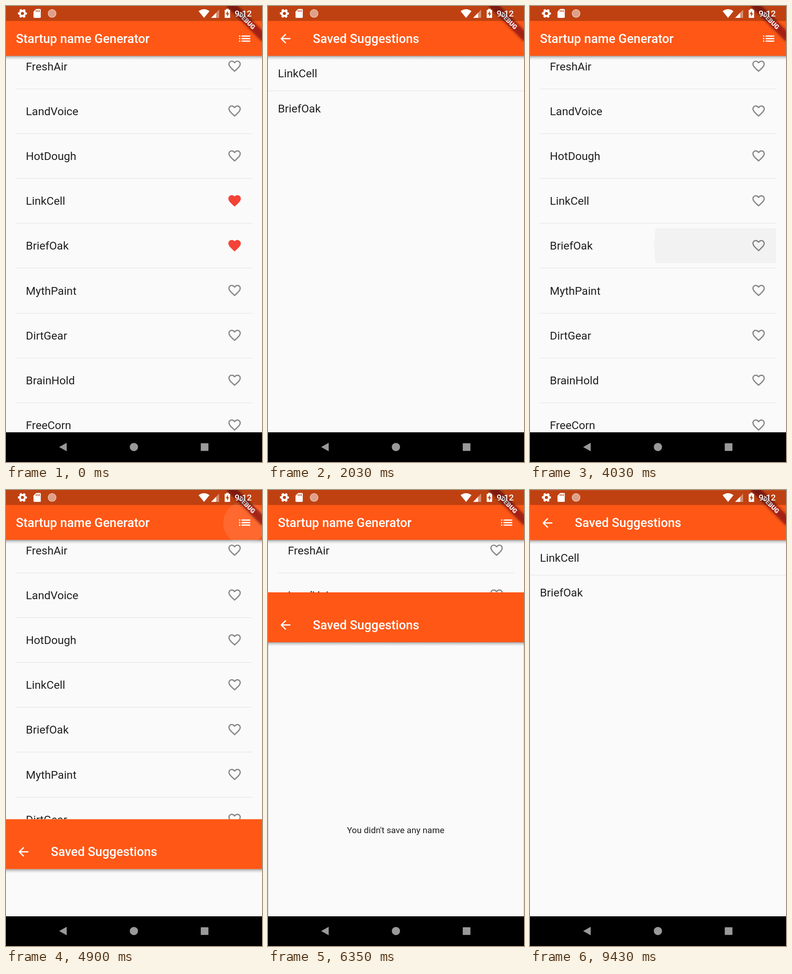
Write an HTML page that moves like this. It is 561 px wide and 998 px high and loops after 9760 ms.

```html
<!DOCTYPE html>
<html lang="en">
<head>
<meta charset="utf-8">
<title>Startup name Generator</title>
<style>
  html, body { margin: 0; width: 100%; height: 100%; overflow: hidden; background: #000; }
  svg { display: block; width: 561px; height: 998px; font-family: Roboto, sans-serif; }
  .title { font-size: 27.27px; font-weight: 500; fill: #fff; }
  .item { font-size: 24.55px; fill: #202020; }
  .note { font-size: 19.09px; fill: #202020; }
  .clock { font-size: 19.09px; font-weight: 500; fill: #fff; }
  .debug { font-size: 13.9px; font-weight: 900; fill: #fff; text-anchor: middle; }
  .rule { fill: #000; fill-opacity: .1; }
</style>
</head>
<body>
<svg viewBox="0 0 561 998">
  <defs>
    <linearGradient id="shade" x2="0" y2="1">
      <stop offset="0" stop-opacity=".36"/>
      <stop offset=".45" stop-opacity=".13"/>
      <stop offset="1" stop-opacity="0"/>
    </linearGradient>
    <filter id="blur" x="-20%" y="-60%" width="140%" height="220%">
      <feGaussianBlur stdDeviation="3"/>
    </filter>
    <clipPath id="tile"><rect id="tileBox" x="21.8" width="517.4" height="76.4"/></clipPath>
    <g id="bar">
      <rect y="109" width="561" height="9" fill="url(#shade)"/>
      <rect width="561" height="109.1" fill="#ff5716"/>
    </g>
    <path id="full" d="M12 21.35l-1.45-1.32C5.4 15.36 2 12.28 2 8.5 2 5.42 4.42 3 7.5 3c1.74 0 3.41.81 4.5 2.09C13.09 3.81 14.76 3 16.5 3 19.58 3 22 5.42 22 8.5c0 3.78-3.4 6.86-8.55 11.54L12 21.35z"/>
    <path id="hollow" d="M16.5 3c-1.74 0-3.41.81-4.5 2.09C10.91 3.81 9.24 3 7.5 3 4.42 3 2 5.42 2 8.5c0 3.78 3.4 6.86 8.55 11.54L12 21.35l1.45-1.32C18.6 15.36 22 12.28 22 8.5 22 5.42 19.58 3 16.5 3zm-4.4 15.55l-.1.1-.1-.1C7.14 14.24 4 11.39 4 8.5 4 6.5 5.5 5 7.5 5c1.54 0 3.04.99 3.57 2.36h1.87C13.46 5.99 14.96 5 16.5 5c2 0 3.5 1.5 3.5 3.5 0 2.89-3.14 5.74-7.9 10.05z"/>
  </defs>

  <g id="home">
    <rect width="561" height="998" fill="#fafafa"/>
    <g id="rows"></g>
    <circle id="splash" cx="501" clip-path="url(#tile)"/>
    <use href="#bar"/>
    <text class="title" x="21.8" y="80.7">Startup name Generator</text>
    <circle id="ripple" cx="523" cy="72" fill="#fff" fill-opacity=".1"/>
    <path transform="translate(506.6 55) scale(1.3636)" fill="#fff"
      d="M3 13h2v-2H3zM3 17h2v-2H3zM3 9h2V7H3zM7 13h14v-2H7zM7 17h14v-2H7zM7 7v2h14V7z"/>
  </g>

  <g id="saved">
    <rect width="561" height="998" fill="#fafafa"/>
    <g id="picks">
      <text class="item" x="21.8" y="156.2">LinkCell</text>
      <rect class="rule" y="185" width="561" height="1"/>
      <text class="item" x="21.8" y="232.6">BriefOak</text>
    </g>
    <g id="none">
      <text class="note" x="173" y="527.5">You didn't save any name</text>
      <path id="edges" d="M.5 109V998M560.5 109V998" stroke="#000" stroke-opacity=".2"/>
    </g>
    <use href="#bar"/>
    <path transform="translate(21.8 55.1) scale(1.3636)" fill="#fff"
      d="M20 11H7.83l5.59-5.59L12 4l-8 8 8 8 1.41-1.41L7.83 13H20z"/>
    <text class="title" x="98.2" y="80.7">Saved Suggestions</text>
  </g>

  <g transform="translate(561 0) rotate(45)">
    <rect x="-54.5" y="38.2" width="109" height="16.4" fill-opacity=".5" filter="url(#blur)"/>
    <rect x="-54.5" y="38.2" width="109" height="16.4" fill="#b71c1c" fill-opacity=".63"/>
    <text class="debug" y="51.3">DEBUG</text>
  </g>

  <g id="status">
    <rect width="561" height="32.7" fill-opacity=".25"/>
    <g fill="none" stroke="#fff">
      <circle cx="36" cy="16.3" r="5.6" stroke-width="4.4"/>
      <circle cx="36" cy="16.3" r="8.2" stroke-width="3.4" stroke-dasharray="4.6 3.987" stroke-dashoffset="2.3"/>
    </g>
    <path fill="#fff" d="M66 6.5h8.5q1.7 0 1.7 1.7v16q0 1.8-1.7 1.8H62q-1.7 0-1.7-1.8V12.2z"/>
    <path stroke="#be4211" stroke-width="1.6" d="M66.2 9v4M69.6 9v4M73 9v4"/>
    <circle cx="101" cy="16.3" r="8.7" fill="#fff" fill-opacity=".5" stroke="#fff" stroke-opacity=".6" stroke-width="1.2"/>
    <path fill="#fff" d="M434 26L422 11.3Q434 2.6 446 11.3z"/>
    <path fill="#fff" fill-opacity=".4" d="M449.5 26L467 8v18z"/>
    <path fill="#fff" d="M449.5 26L460.5 14.7V26z"/>
    <path fill="#fff" d="M479.3 8.5h3.2V6.3h5.4v2.2h3.2V26h-11.8z"/>
    <path fill="#be4211" d="M486.2 10.5l-4.6 7.6h2.9v5.6l4.4-7.6h-2.7z"/>
    <text class="clock" x="501" y="23.3">9:12</text>
  </g>

  <rect y="933" width="561" height="65"/>
  <g fill="#999">
    <path d="M116.5 965.2L133 956v18.4z"/>
    <circle cx="280.3" cy="965.2" r="9"/>
    <rect x="426.8" y="957" width="16.8" height="16.8" rx="1"/>
  </g>
</svg>

<script>
const LOOP = 9760, HEIGHT = 998, SLIDE = 300, PITCH = 98.18, FIRST = 132.2;
const names = ['FreshAir', 'LandVoice', 'HotDough', 'LinkCell', 'BriefOak',
  'MythPaint', 'DirtGear', 'BrainHold', 'FreeCorn'];

// The screen refreshes only inside these bursts: start, end, steps.
const bursts = [[260, 2030, 44], [2240, 2530, 8], [3350, 3600, 7], [3890, 4030, 5],
  [4610, 5060, 7], [6010, 6350, 9], [7510, 7810, 8], [8230, 8440, 5], [9010, 9430, 10]];
const visits = [[908, 2379.4], [4755, 6200], [9141, Infinity]]; // open, close
const presses = [260, 4610, 9010];
const taps = [[3350, 3, false], [3890, 4, false], [7510, 3, true], [8230, 4, true]]; // time, row, liked

const $ = id => document.getElementById(id);
const set = (el, attrs) => {
  for (const key in attrs) el.setAttribute(key, attrs[key]);
  return el;
};
const add = (parent, tag, attrs) =>
  parent.appendChild(set(document.createElementNS('http://www.w3.org/2000/svg', tag), attrs));
const show = (el, on) => { el.style.display = on ? '' : 'none'; };
const clamp = x => Math.min(1, Math.max(0, x));
const last = (list, t) => list.filter(entry => entry[0] <= t).pop();

const hearts = names.map((name, i) => {
  const y = FIRST + i * PITCH;
  add($('rows'), 'text', { class: 'item', x: 43.6, y: y + 8.4 }).textContent = name;
  add($('rows'), 'rect', { class: 'rule', x: 22, y: Math.round(y + 48.5), width: 517, height: 1 });
  return add($('rows'), 'use', { transform: `translate(484.6 ${y - 16.9}) scale(1.3636)` });
});

// cubic-bezier(.4, 0, .2, 1)
function ease(x) {
  let lo = 0, hi = 1;
  for (let i = 0; i < 24; i++) {
    const u = (lo + hi) / 2, v = 1 - u;
    if (1.2 * v * v * u + 0.6 * v * u * u + u * u * u < x) lo = u; else hi = u;
  }
  return lo * lo * (3 - 2 * lo);
}

function refreshed(t) {
  const burst = last(bursts, t);
  if (!burst) return 0;
  const [start, end, n] = burst, step = (end - start) / (n - 1);
  return start + step * Math.min(n - 1, Math.floor((t - start) / step + 0.01));
}

function pageTop(t) {
  const visit = last(visits, t);
  if (!visit) return HEIGHT;
  const [open, close] = visit;
  const p = t < close ? (t - open) / SLIDE : 1 - (t - close) / SLIDE;
  return HEIGHT * (1 - ease(clamp(p)));
}

function draw(time) {
  const t = refreshed(time % LOOP);

  const liked = names.map((_, i) => i === 3 || i === 4);
  for (const [at, row, on] of taps) if (t >= at + 30) liked[row] = on;
  hearts.forEach((heart, i) => set(heart, {
    href: liked[i] ? '#full' : '#hollow',
    fill: liked[i] ? '#f44336' : '#888'
  }));

  const tap = last(taps, t);
  const age = tap ? t - tap[0] : 999;
  const y = FIRST + (tap ? tap[1] : 0) * PITCH;
  set($('tileBox'), { y: y - 38.2 });
  set($('splash'), {
    cy: y,
    r: 20 + 290 * (1 - Math.exp(-age / 110)),
    'fill-opacity': 0.09 * clamp(1 - age / 210)
  });

  const press = presses.filter(at => at <= t).pop();
  const held = t - press;
  set($('ripple'), { r: held < 1000 ? 47 * clamp(held / 150) : 0 });

  const top = pageTop(t), any = liked.includes(true);
  set($('saved'), { transform: `translate(0 ${top.toFixed(2)})` });
  show($('saved'), top < HEIGHT - 0.5);
  show($('picks'), any);
  show($('none'), !any);
  show($('edges'), t >= 6010);
}

const begin = performance.now();
function tick() {
  draw(performance.now() - begin);
  requestAnimationFrame(tick);
}
tick();
</script>
</body>
</html>
```
